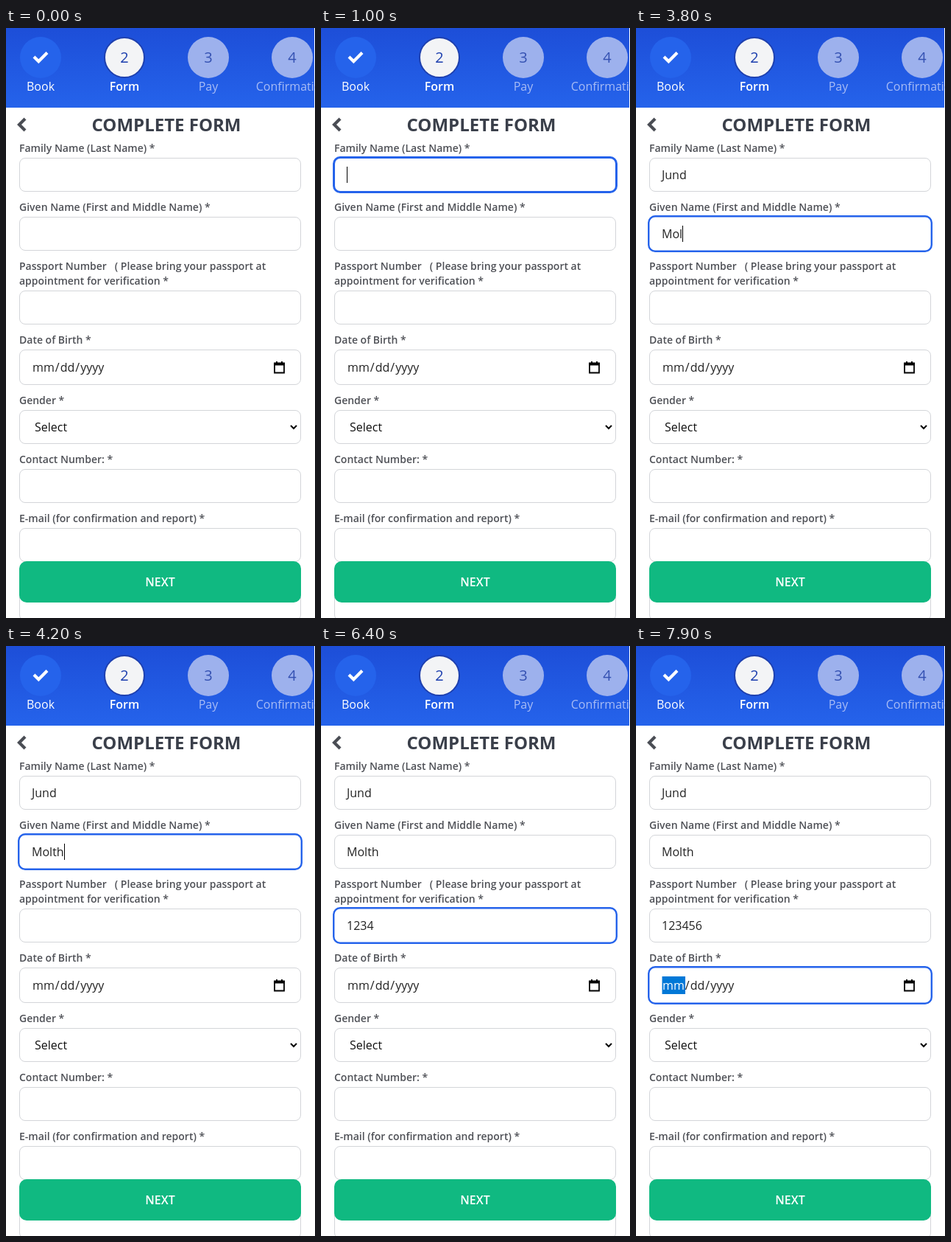
Recreate the animation shown at these times as an HTML page. Size 420 by 800 pixels, loop 8 s.

```html
<!DOCTYPE html>
<html lang="en">
<head>
<meta charset="utf-8">
<title>Complete form</title>
<style>
  html, body { margin: 0; height: 100%; overflow: hidden; background: #fff; }
  svg { display: block; font: 16px "Open Sans", sans-serif; }
  .label { font-size: 14px; font-weight: 600; fill: #4e5056; white-space: pre; }
  .box { fill: #fff; stroke: #d3d5d9; }
  .mid { text-anchor: middle; }
  .icon { fill: none; stroke-width: 4.2; }
</style>
</head>
<body>
<svg width="420" height="800" viewBox="0 0 420 800">
  <defs>
    <linearGradient id="blue" x2="0" y2="1">
      <stop stop-color="#1d4ed8"/><stop offset="1" stop-color="#2563eb"/>
    </linearGradient>
  </defs>
  <rect width="419" height="108" fill="url(#blue)"/>
  <g id="steps" class="mid"></g>
  <path class="icon" d="M38 39L44.3 45.3L56 33.6" stroke="#fff"/>
  <path class="icon" d="M26 123L18 131L26 139" stroke="#4a4d54"/>
  <text class="mid" x="218" y="140" font-size="24" font-weight="700" fill="#3a3f4a">COMPLETE FORM</text>
  <g id="form"></g>
  <rect id="ring" x="16" fill="#fff" stroke="#2563eb"/>
  <rect id="mark" x="35.5" y="448" width="31.5" height="24" fill="#0078d7"/>
  <text x="36" y="466" fill="#222"><tspan id="month">mm</tspan><tspan dx="1">/</tspan><tspan dx="1">dd</tspan><tspan dx="1">/</tspan><tspan dx="1">yyyy</tspan></text>
  <path d="M365 454.5H378V467.5H365ZM368 452V455M375 452V455" fill="none" stroke="#000" stroke-width="1.8"/>
  <path d="M364 454H379V457.5H364Z"/>
  <text x="39" y="547" fill="#111">Select</text>
  <path d="M387 539L391 543L395 539" fill="none" stroke="#000" stroke-width="2"/>
  <g id="values" fill="#222"></g>
  <rect id="caret" width="1" height="22"/>
  <rect x="18" y="723" width="383" height="56" rx="10" fill="#10b981"/>
  <text class="mid" x="209.5" y="757" font-weight="600" fill="#fff">NEXT</text>
</svg>
<script>
const LOOP = 8000, BLINK = 500;
const $ = id => document.getElementById(id);

const steps = [
  ["", "Book", "#2563eb", "#fff"],
  ["2", "Form", "#f3f4f6", "#fff"],
  ["3", "Pay", "#9db1ed", "#a8bcf5"],
  ["4", "Confirmation", "#9db1ed", "#a8bcf5"],
];
$("steps").innerHTML = steps.map(([digit, name, fill, ink], i) => {
  const x = 47 + 114 * i, active = i === 1;
  return `<circle cx="${x}" cy="40" r="${active ? 27 : 28}" fill="${fill}" ${active ? 'stroke="#1e40af" stroke-width="2"' : ""}/>
    <text x="${x}" y="47" font-size="20" fill="${active ? "#1e40af" : "#3451b2"}">${digit}</text>
    <text x="${x}" y="85" fill="${ink}" font-weight="${active ? 600 : 400}">${name}</text>`;
}).join("");

// Top and height of each box, then its label lines
const fields = [
  [176, 46, "Family Name (Last Name) *"],
  [256, 46, "Given Name (First and Middle Name) *"],
  [356, 46, "Passport Number \u00a0\u00a0( Please bring your passport at", "appointment for verification *"],
  [436, 48, "Date of Birth *"],
  [518, 46, "Gender *"],
  [598, 46, "Contact Number: *"],
  [678, 46, "E-mail (for confirmation and report) *"],
  [758, 46],
];
$("form").innerHTML = fields.map(([y, h, ...lines]) =>
  `<rect class="box" x="18.5" y="${y + 0.5}" width="382" height="${h - 1}" rx="7.5"/>` +
  lines.map((line, i) =>
    `<text class="label" x="18" y="${y - 8 - 20 * (lines.length - 1 - i)}">${line}</text>`).join("")
).join("");

$("values").innerHTML = fields.slice(0, 3).map(([y]) => `<text x="35" y="${y + 29}"></text>`).join("");
const values = [...$("values").children];

// Each entry: field, full text, focus time, key times
const inputs = [
  [0, "Jund", 900, [1900, 2100, 2300, 2500]],
  [1, "Molth", 3000, [3400, 3600, 3800, 4000, 4200]],
  [2, "123456", 4700, [5100, 5200, 5500, 5900, 6500, 6900]],
  [3, "", 7400, []],
];

function set(id, attrs) {
  for (const name in attrs) $(id).setAttribute(name, attrs[name]);
}

function draw(t) {
  inputs.slice(0, 3).forEach(([i, text, , keys]) => {
    values[i].textContent = text.slice(0, keys.filter(k => k <= t).length);
  });
  const current = inputs.filter(input => input[2] <= t).pop();
  const inDate = current?.[0] === 3;
  set("ring", { visibility: current ? "visible" : "hidden" });
  set("mark", { visibility: inDate ? "visible" : "hidden" });
  set("month", { fill: inDate ? "#fff" : "#222" });
  set("caret", { visibility: "hidden" });
  if (!current) return;

  const [i, , focus, keys] = current, [y, h] = fields[i];
  const weight = t < 1300 ? 3 : 2.4;
  set("ring", {
    x: 16 + weight / 2, y: y - 2 + weight / 2,
    width: 387 - weight, height: h + 4 - weight,
    rx: 10 - weight / 2, "stroke-width": weight,
  });
  if (inDate) return;

  const lastKey = Math.max(focus, 1000, ...keys.filter(k => k <= t));
  const on = t < lastKey || Math.floor((t - lastKey) / BLINK) % 2 === 0;
  const x = 35 + Math.round(values[i].getComputedTextLength());
  set("caret", { x, y: y + 12, visibility: on ? "visible" : "hidden" });
}

const start = performance.now();
function tick() {
  draw((performance.now() - start) % LOOP);
  requestAnimationFrame(tick);
}
tick();
</script>
</body>
</html>
```
